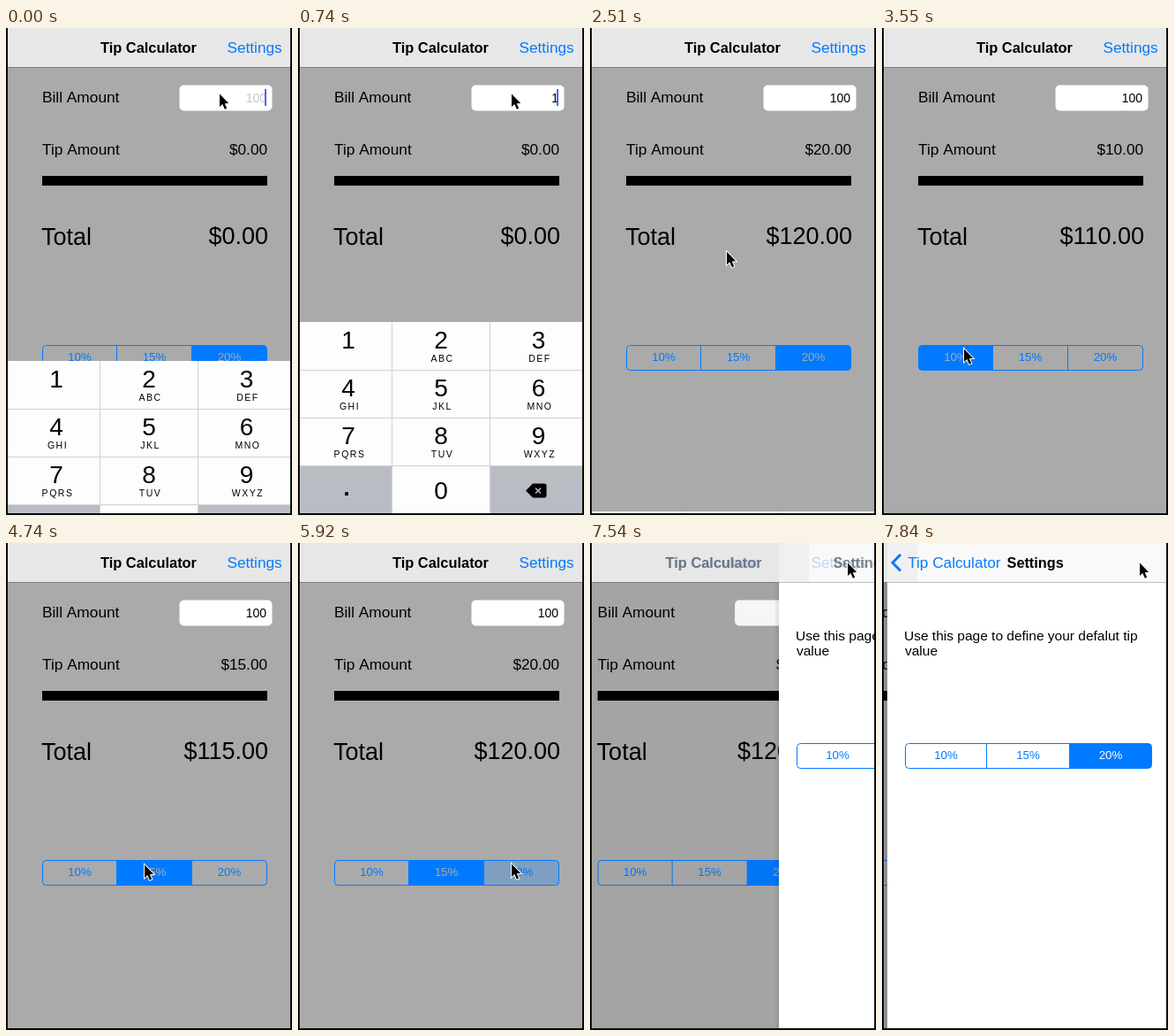
These frames come from a looping animation (324x550 px, 7990 ms). An HTML page with a canvas:

```html
<!DOCTYPE html>
<html lang="en">
<head>
<meta charset="utf-8">
<title>Tip Calculator</title>
<style>
html, body { margin: 0; width: 100%; height: 100%; overflow: hidden; background: #000; }
canvas { display: block; }
</style>
</head>
<body>
<canvas id="stage" width="324" height="550"></canvas>
<script>
const g = document.getElementById('stage').getContext('2d');
const LOOP = 7990, TICK = 148, LAST = 53;
const BLUE = '#007aff', GRAY = '#aaaaaa';
const RATES = [10, 15, 20];

// pointer stops: tick, x, y
const PATH = [
  [10, 241, 74], [13, 180, 197], [15, 180, 197], [18, 141, 280], [21, 92, 362],
  [26, 92, 362], [28, 156, 363], [34, 156, 363], [37, 241, 362],
  [42, 241, 362], [47, 279, 45], [48, 279, 45], [49, 291, 22]
];

const clamp = v => Math.max(0, Math.min(1, v));
// critically damped spring, 0 to 1
const spring = x => x <= 0 ? 0 : 1 - (1 + x) * Math.exp(-x);

function rect(x, y, w, h, color) {
  g.fillStyle = color;
  g.fillRect(x, y, w, h);
}

function round(x, y, w, h, r) {
  g.beginPath();
  g.roundRect(x, y, w, h, r);
}

function poly(points) {
  g.beginPath();
  points.forEach(([x, y]) => g.lineTo(x, y));
}

function text(s, x, y, size, { color = '#000', align = 'left', weight = 400, gap = 0, alpha = 1 } = {}) {
  g.font = `${weight} ${size}px "Liberation Sans", Arial, sans-serif`;
  g.letterSpacing = gap + 'px';
  g.textAlign = align;
  g.fillStyle = color;
  g.globalAlpha = clamp(alpha);
  g.fillText(s, x, y);
  g.globalAlpha = 1;
}

function segments(xs, y, chosen, pressed, onColor) {
  const left = xs[0], width = xs[3] - left;
  g.save();
  round(left, y, width, 28, 4);
  g.clip();
  RATES.forEach((rate, i) => {
    const w = xs[i + 1] - xs[i], on = i === chosen;
    if (on) rect(xs[i], y, w, 28, BLUE);
    else if (i === pressed) rect(xs[i], y, w, 28, 'rgba(0,122,255,.25)');
    text(rate + '%', xs[i] + w / 2, y + 17.5, 13.3, { color: on ? onColor : BLUE, align: 'center' });
  });
  g.restore();
  g.strokeStyle = BLUE;
  g.lineWidth = 1;
  round(left, y, width, 28, 4);
  for (const x of xs.slice(1, 3)) {
    g.moveTo(x, y);
    g.lineTo(x, y + 28);
  }
  g.stroke();
}

function home(n, push) {
  const chosen = n < 24 ? 2 : n < 32 ? 0 : n < 41 ? 1 : 2;
  const pressed = { 23: 0, 31: 1, 40: 2 }[n] ?? -1;
  const bill = n < 14 ? 0 : 100;
  const tip = bill * RATES[pressed < 0 ? chosen : pressed] / 100;
  const right = { align: 'right' };

  rect(0, 0, 324, 550, GRAY);
  g.save();
  g.translate(-96 * push, 0);
  text('Bill Amount', 41, 84, 17.3);
  text('Tip Amount', 41, 143, 17.3);
  text('$' + tip.toFixed(2), 296, 143, 17.2, right);
  rect(41, 167, 255, 11, '#000');
  text('Total', 40, 244.5, 27);
  text('$' + (bill + tip).toFixed(2), 297, 244, 27, right);

  g.fillStyle = '#fff';
  round(196.5, 64.5, 105, 29, 5);
  g.fill();
  const typed = n < 5 ? '' : n < 8 ? '1' : n < 9 ? '10' : '100';
  text(typed || '100', 295, 84, 14, { align: 'right', color: typed ? '#000' : '#c7c7cd' });
  if (n < 14) rect(293, 69, 2, 19, '#426bf2');

  segments([41.5, 125.5, 210.5, 295.5], 358.5, chosen, pressed, GRAY);
  g.restore();
}

function keyboard(n) {
  const top = n < 13 ? 548 - 216 * spring(2.97 + 2 * n) : 332 + 216 * spring(2 * (n - 13.65));
  if (top > 547.5) return;
  const centers = [57, 162, 272.5];
  const letters = ['', 'ABC', 'DEF', 'GHI', 'JKL', 'MNO', 'PQRS', 'TUV', 'WXYZ'];
  g.save();
  g.translate(0, Math.round(top));
  rect(2, 0, 320, 216, '#fdfdfd');
  rect(2, 162, 104, 54, '#b9bdc3');
  rect(218, 162, 104, 54, '#b9bdc3');
  for (let i = 1; i < 4; i++) rect(2, 54 * i, 320, 1, '#d0d1d4');
  for (const x of [106, 217]) rect(x, 0, 1, 216, '#d0d1d4');

  letters.forEach((s, i) => {
    const x = centers[i % 3], y = 54 * Math.floor(i / 3);
    text(i + 1, x, y + 30, 28, { align: 'center' });
    text(s, x + 1.5, y + 45, 10.5, { align: 'center', gap: 1.5 });
  });
  text('0', 162, 200, 28, { align: 'center' });
  text('.', 55, 196, 26, { align: 'center', weight: 700 });

  // delete key
  g.fillStyle = '#000';
  g.strokeStyle = '#b9bdc3';
  g.lineWidth = 1.5;
  poly([[258, 190.5], [266, 182.5], [280, 182.5], [281.5, 184], [281.5, 197], [280, 198.5], [266, 198.5]]);
  g.fill();
  g.beginPath();
  for (const d of [-3, 3]) {
    g.moveTo(272 - d, 187.5);
    g.lineTo(272 + d, 193.5);
  }
  g.stroke();
  g.restore();
}

function settings(x, push) {
  rect(0, 45, x, 505, `rgba(0,0,0,${0.1 * push})`);
  const shade = g.createLinearGradient(x - 6, 0, x, 0);
  shade.addColorStop(0, 'rgba(0,0,0,0)');
  shade.addColorStop(1, 'rgba(0,0,0,.1)');
  rect(x - 6, 45, 6, 505, shade);
  rect(x, 0, 324, 550, '#fff');
  g.save();
  g.translate(x, 0);
  text('Use this page to define your defalut tip', 19, 110, 15.5);
  text('value', 20, 127, 15.5);
  segments([20.5, 112.5, 206.5, 299.5], 226.5, 2, -1, '#fff');
  g.restore();
}

function navBar(x, push) {
  rect(0, 0, 324, 44, '#e7e7e7');
  if (push) {
    rect(x, 0, 324, 44, '#f0f0f0');
    rect(x + 34, 0, 324, 44, '#f9f9f9');
  }
  rect(0, 44, 324, 1, 'rgba(0,0,0,.25)');

  const titleX = 107 - 79 * push ** 1.2;
  text('Tip Calculator', titleX, 28, 16.4, { weight: 700, alpha: 1 - 1.5 * push });
  text('Settings', 250.5, 28, 17.2, { color: BLUE, alpha: 1 - 2.2 * push });
  if (!push) return;
  text('Tip Calculator', titleX, 28, 17.2, { color: BLUE, alpha: push ** 1.4 });
  text('Settings', 345 - 206 * push, 28, 16.3, { weight: 700, alpha: 1.4 * push });
  g.globalAlpha = clamp(2 * push - 0.9);
  g.strokeStyle = BLUE;
  g.lineWidth = 3;
  poly([[21, 13], [12, 22.2], [21, 31.5]]);
  g.stroke();
  g.globalAlpha = 1;
}

function pointer(n) {
  let i = PATH.findIndex(p => p[0] >= n);
  if (i < 0) i = PATH.length - 1;
  const b = PATH[i], a = PATH[i - 1] || b;
  const k = b === a ? 1 : clamp((n - a[0]) / (b[0] - a[0]));
  g.save();
  g.translate(a[1] + (b[1] - a[1]) * k + 1, a[2] + (b[2] - a[2]) * k + 0.5);
  poly([[0, 0], [0, 14.5], [3.3, 11.5], [5.8, 17.3], [8.2, 16.3], [5.7, 10.7], [10.2, 10.5]]);
  g.closePath();
  g.strokeStyle = '#fff';
  g.lineWidth = 2;
  g.stroke();
  g.fillStyle = '#000';
  g.fill();
  g.restore();
}

function draw(n) {
  const push = spring(1.2 + 2.6 * (n - 51)) * (n >= 51);
  const x = Math.round(322 - 320 * push);
  home(n, push);
  keyboard(n);
  if (push) settings(x, push);
  navBar(x, push);
  pointer(n);
  rect(0, 0, 2, 550, '#08080c');
  rect(322, 0, 2, 550, '#08080c');
  rect(0, 548, 324, 2, '#08080c');
}

// the screen refreshes in even ticks
const start = performance.now();
function loop() {
  const t = (performance.now() - start) % LOOP;
  draw(Math.min(LAST, Math.floor((t + 9) / TICK)));
  requestAnimationFrame(loop);
}
loop();
</script>
</body>
</html>
```
